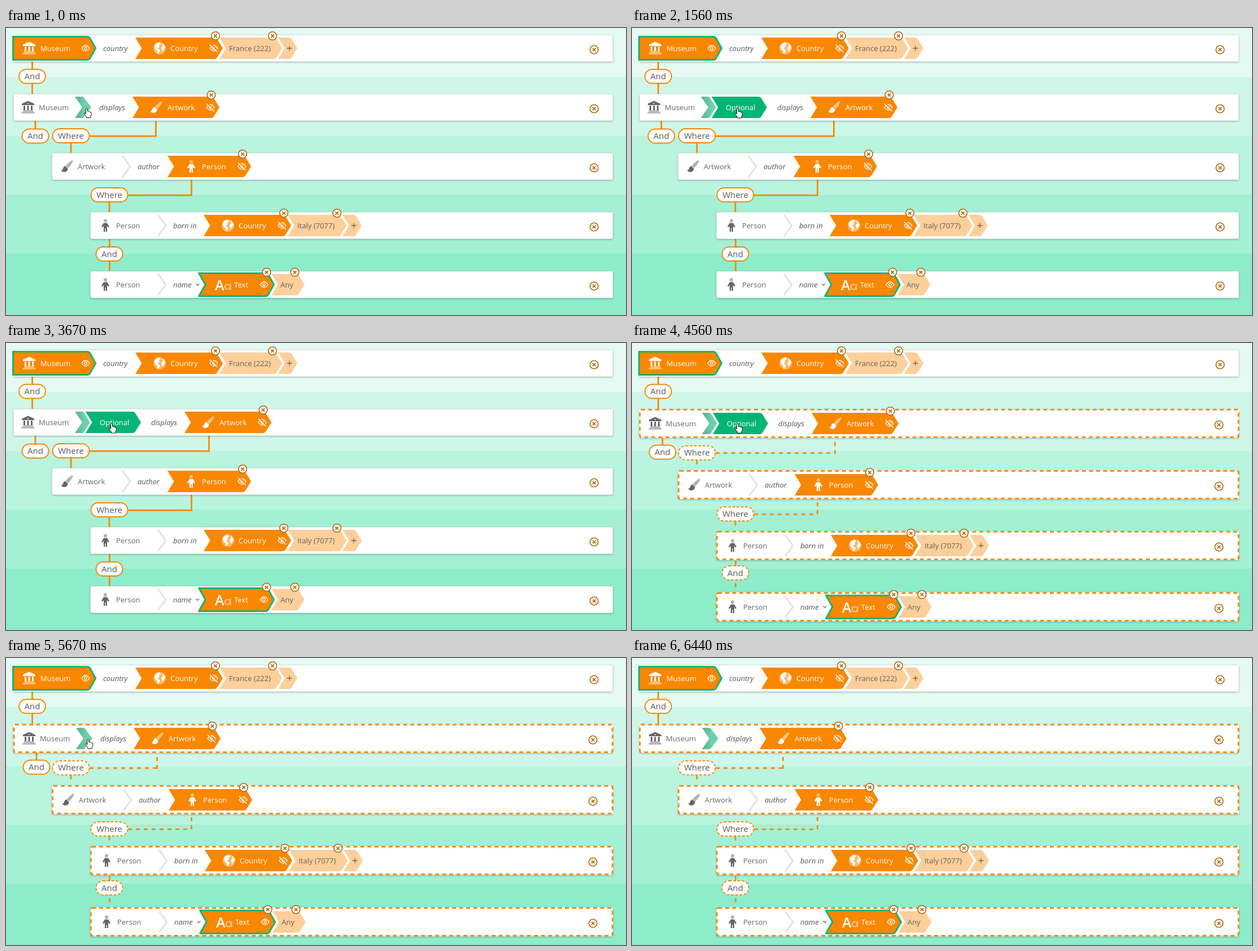
An HTML page that plays this animation: 1098 px wide and 510 px high, repeating every 6.68 s.

```html
<!DOCTYPE html>
<html lang="en">
<head>
<meta charset="utf-8">
<title>Query builder</title>
<style>
html, body { margin: 0; width: 100%; height: 100%; overflow: hidden; }
svg { display: block; width: 1098px; height: 510px; }
text { font: 13px "Open Sans", sans-serif; }
.verb { font-style: italic; fill: #555; }
.pill { font-size: 15px; text-anchor: middle; fill: #5a5a5a; }
.card { filter: drop-shadow(0 1px 1.5px rgba(0,0,0,.28)); }
</style>
</head>
<body>
<svg viewBox="0 0 1098 510">
  <defs><linearGradient id="fold"><stop offset="0" stop-color="#5cae8f"/><stop offset=".6" stop-color="#6dd0aa"/></linearGradient></defs>
  <g id="scene"></g>
  <g id="cursor" fill="#fff" stroke="#111" stroke-linejoin="round"><path/></g>
</svg>
<script>
const LOOP = 6680, ORANGE = '#f98700', PALE = '#fccf9b', GREEN = '#04b476', GREY = '#666', BROWN = '#b5660c';
const BANDS = ['#e5faf3', '#cff7e9', '#b9f4df', '#a3f0d4', '#8decca'];
const EDGES = [0, 87, 191.5, 296, 401, 510];
const LEFT = [13, 13, 81.5, 149.5, 149.5];
const LINE = 2.75;

const at = (x, y, body) => `<g transform="translate(${x} ${y})">${body}</g>`;
const path = (d, attrs) => `<path d="${d}" ${attrs}/>`;
const stroke = (color, w) => `fill="none" stroke="${color}" stroke-width="${w}"`;
const label = (x, s, color = GREY) => `<text x="${x}" y="5" fill="${color}">${s}</text>`;
const verb = (x, s) => `<text class="verb" x="${x}" y="5">${s}</text>`;

// Right end of a ribbon: rounded shoulders and a point, drawn from top to bottom
const head = (tip, h) => `H${tip - 15}Q${tip - 11.5} ${-h} ${tip - 9.5} ${3.5 - h}L${tip} 0 ${tip - 9.5} ${h - 3.5}Q${tip - 11.5} ${h} ${tip - 15} ${h}`;
const ribbon = (x, tip, color, attrs = '', h = 19) =>
  path(`M${x} ${-h}${head(tip, h)}H${x}l11.5 ${-h}z`, `fill="${color}" ${attrs}`);
const close = (x, y = -22) => at(x, y,
  `<circle r="7.3" fill="#fff" stroke="${BROWN}" stroke-width="1.6"/>` +
  path('M-2.7-2.7 2.7 2.7M2.7-2.7-2.7 2.7', stroke(BROWN, 1.7)));
const eye = (x, off) => at(x, 0,
  path('M-7 0Q0-10 7 0Q0 10-7 0z', stroke('#fff', 1.3)) +
  `<circle r="2.3" ${stroke('#fff', 1.3)}/>` +
  (off ? path('M-6-7.5 7.5 6', stroke(ORANGE, 2)) + path('M-7-6.5 6.5 7', stroke('#fff', 1.4)) : ''));
const chevron = x => path(`M${x}-19l14 19-14 19`, stroke('#e4e4e4', 3));
const value = (x, tip, s, tx) => ribbon(x, tip, PALE) + label(tx, s, '#6b5f52') + close(tip - 17);
const plus = x => ribbon(x, x + 34, PALE) + path(`M${x + 15.5} 0h9m-4.5-4.5v9`, stroke('#75644f', 1.3));

const icons = {
  bank: c => path('M0-11.5 11-6.5V-4H-11V-6.5zM-8-3h3v8h-3zM-1.5-3h3v8h-3zM5-3h3v8h-3z', `fill="${c}"`) +
    path('M-9 5H9v3H11.5V11H-11.5V8H-9z', `fill="${c}" opacity=".45"`) +
    '<circle cy="-7" r="1.3" fill="#fff" opacity=".7"/>',
  brush: c => path('M8-10.5Q11-11.5 10.5-8.5Q7-2 2 3L-2.5-1Q2-6.5 8-10.5z', `fill="${c}" opacity=".5"`) +
    path('M-3-.5 1.5 3.5Q1.5 10-5 10Q-9 10-10.5 6Q-8 7.5-7 4Q-6-.5-3-.5z', `fill="${c}"`),
  person: c => `<circle cy="-8.5" r="3" fill="${c}" opacity=".5"/>` +
    path('M-3-4.5H3L7 2 5 3.5 3 .5V11H.6V5H-.6V11H-3V.5L-5 3.5-7 2z', `fill="${c}"`),
  globe: c => `<circle r="11" fill="${c}" opacity=".4"/>` +
    path('M-9.5-4Q-6-10 0-10.5L2-7-1-5 0-2-4 0-1 2 1 5-2 10-4 9V5L-8 1zM4-9Q9-6 10.5-1L8 2 6 6 4 3 3-1 6-4z', `fill="${c}"`)
};
const icon = (name, x, color = '#fff') => at(x, 0, icons[name](color));
const target = (x, tip, name, s, ix, tx) =>
  ribbon(x, tip, ORANGE) + icon(name, ix) + label(tx, s, '#fff') + eye(tip - 16, true);
const country = x => target(x, x + 155, 'globe', 'Country', x + 43, x + 62) + close(x + 142);
const letters = '<text x="370" y="9.5" fill="#fff" style="font-size:25px;font-weight:600">A</text>' +
  `<g opacity=".5"><circle cx="392.3" cy="4" r="4.4" ${stroke('#fff', 2.4)}/>${path('M397.3-1.5v11', stroke('#fff', 2.4))}</g>`;

function row(i, { open, hot }) {
  const outline = `stroke="${GREEN}" stroke-width="${LINE}" stroke-linejoin="round"`;
  if (i == 0) return path(`M12.5-20.7${head(158.7, 20.7)}H12.5z`, `fill="${ORANGE}" ${outline}`) +
    icon('bank', 41) + label(61, 'Museum', '#fff') + eye(141) + verb(172, 'country') +
    country(229) + value(378, 489, 'France (222)', 395) + plus(482);
  if (i == 1) return icon('bank', 39, GREY) + label(58, 'Museum') +
    path('M122-19h14.5L151 0 136.5 19H122L135 0z', 'fill="url(#fold)"') +
    (open ? ribbon(137, 160, '#fff') + ribbon(141, 239, hot ? GREEN : '#68d2ab') + label(166, 'Optional', '#fff') : '') +
    at(open ? 92 : 0, 0, verb(165, 'displays') +
      target(224, 378, 'brush', 'Artwork', 266, 286) + close(363.5));
  if (i == 2) return icon('brush', 108, GREY) + label(127, 'Artwork') + chevron(206) + verb(233, 'author') +
    target(286, 434, 'person', 'Person', 328, 347) + close(419);
  const person = icon('person', 176, GREY) + label(195, 'Person') + chevron(269);
  if (i == 3) return person + verb(296, 'born in') + country(350) +
    value(499, 603, 'Italy (7077)', 516) + plus(596);
  return person + verb(296, 'name') + path('M336.5-1.5l2.8 3 2.8-3', stroke('#777', 1.5)) +
    ribbon(341.5, 474.5, ORANGE, outline, 20.5) + letters +
    label(404, 'Text', '#fff') + eye(457) + close(461.5) + value(470, 528.5, 'Any', 486);
}

function pill(x, y, s, dash) {
  const w = s == 'And' ? 47 : 65;
  return `<rect x="${x - w / 2}" y="${y - 12.5}" width="${w}" height="25" rx="12.5" fill="#fff" stroke="${ORANGE}"
    stroke-width="1.9" ${dash ? 'stroke-dasharray="4.5 3"' : ''}/><text class="pill" x="${x}" y="${y + 5}">${s}</text>`;
}
const wire = (d, dash) => path(d, stroke(ORANGE, LINE) + (dash ? ' stroke-dasharray="7 7"' : ''));

function scene(s) {
  const dash = s.dash;
  let out = BANDS.map((c, i) =>
    `<rect y="${EDGES[i]}" width="1098" height="${EDGES[i + 1] - EDGES[i]}" fill="${c}"/>`).join('');

  // Links between the rows
  const w1 = dash ? 195.7 : 192, w2 = dash ? 304.3 : 297, a3 = dash ? 408.5 : 401.5;
  out += wire('M46.5 60V117') + pill(46.5, 86, 'And');
  if (s.and) {
    const k = dash ? 2 : 0;
    out += wire(`M${52 + k} ${165 + k}v16`) + pill(52 + k, 192 + k, 'And');
  }
  const elbow = (x, top, y, px, next) =>
    wire(`M${x} ${top}V${y + 1.4}M${px + 33} ${y}H${x}M${px} ${y + 13}V${next}`, dash) + pill(px, y - .5, 'Where', dash);
  out += elbow(s.linkX, dash ? 176 : 165, w1, 115, dash ? 217 : 222);
  out += elbow(328.5, dash ? 283 : 270, w2, 183, dash ? 325 : 327);
  out += (dash ? wire('M183.5 387v8M183.5 427v7') : wire('M183.5 375V432')) + pill(183, a3, 'And', dash);

  for (let i = 0; i < 5; i++) {
    const d = dash && i > 0, shift = d ? Math.round(3.67 * (i - 1)) : 0;
    const x = LEFT[i], y = 12 + 105 * i + shift, h = d ? 51.7 : 48, w = 1075 - x;
    out += `<rect class="card" x="${x}" y="${y}" width="${w}" height="${h}" rx="3" fill="#fff"/>`;
    out += d
      ? `<rect x="${x + 1}" y="${y + 1.4}" width="${w - 2}" height="${h - 2.8}" rx="2" ${stroke(ORANGE, LINE)} stroke-dasharray="7 5.5"/>`
      : `<rect x="${x + .5}" y="${y + .5}" width="${w - 1}" height="${h - 1}" rx="3" ${stroke('#e2e5e3', 1)}/>`;
    const cy = y + 24 + (d ? 2 : 0);
    out += at(d ? 2 : 0, cy, row(i, s)) + close(d ? 1039.5 : 1041.5, cy + 2.5);
  }
  return out;
}

const HAND = 'M-1.5 1.5Q0-1 1.5 1.5V6Q3 5 4 6.7 5.5 6 6.3 7.5 8.5 7.3 8.5 9.5V12L7 15V17.5H-.5V15.5L-4.5 10.5Q-5 8.5-3 8.7L-1.5 10.5z';
const POINTER = 'M0 0V15L3.5 11.8 5.7 16.5 8 15.5 6 11H11z';
// Progress of a move that jumps ahead n times between a and b
const steps = (t, a, b, n) =>
  t < a ? 0 : Math.min(n, Math.floor((t - a) / (b - a) * (n - 1) + 1.001)) / n;

function cursorAt(t) {
  const go = steps(t, 1110, 1560, 5), back = steps(t, 4890, 5220, 4), leave = steps(t, 6000, 6220, 3);
  return [142.8 + 44.2 * go - 41.7 * back - 75 * leave, 142 + .5 * go + back - 144 * leave];
}

const sceneEl = document.getElementById('scene');
const cursorEl = document.getElementById('cursor');
let last = '';
function draw(now) {
  const t = now % LOOP;
  const state = {
    dash: t >= 2220 && t < 3670 || t >= 4560,
    open: t >= 670 && t < 5670,
    hot: t >= 1220,
    and: t < 6000
  };
  state.linkX = 265.5 + (state.open ? 92 : 0) + (t >= 2220 ? 2 : 0);
  const key = JSON.stringify(state);
  if (key != last) sceneEl.innerHTML = scene(state);
  last = key;
  cursorEl.setAttribute('transform', `translate(${cursorAt(t)})`);
  cursorEl.setAttribute('visibility', t < 6440 ? 'visible' : 'hidden');
  cursorEl.firstElementChild.setAttribute('d', t < 6000 ? HAND : POINTER);
}
const start = performance.now();
function tick() {
  draw(performance.now() - start);
  requestAnimationFrame(tick);
}
tick();
</script>
</body>
</html>
```
